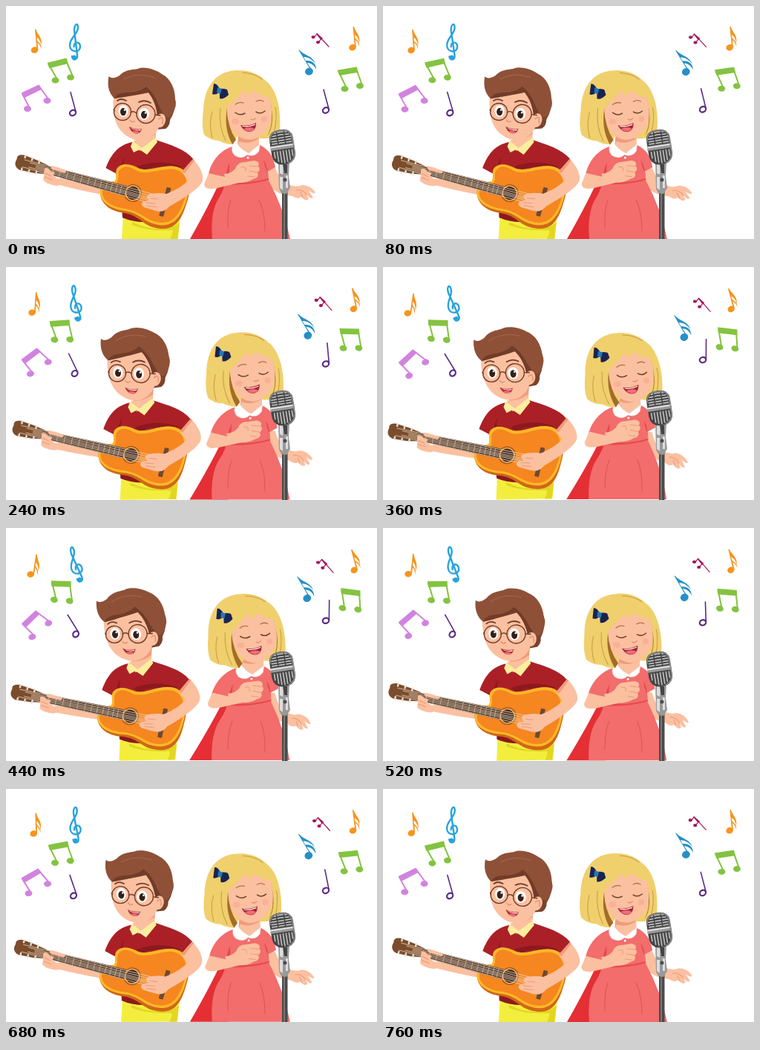
An HTML page that plays this animation: 500 by 315 pixels, repeating every 0.8 s.

```html
<!DOCTYPE html>
<html lang="en">
<head>
<meta charset="utf-8">
<title>Singing children</title>
<style>
html, body { margin: 0; width: 100%; height: 100%; overflow: hidden; background: #fff; }
svg { display: block; width: 100vw; height: 100vh; }
.line { fill: none; stroke-linecap: round; stroke-linejoin: round; }
.skin { fill: #fbc0a0; }
.shade { fill: #ef9c7a; }
.orange { fill: #f7941e; }
.blue { stroke: #27a3dd; fill: #27a3dd; }
.green { fill: #84c341; stroke: #84c341; }
.lilac { fill: #d183df; stroke: #d183df; }
.violet { stroke: #5b2c83; }
.plum { fill: #a5175f; stroke: #a5175f; }
</style>
</head>
<body>
<svg viewBox="0 0 500 315">
  <defs>
    <g id="flagged">
      <ellipse rx="4.800" ry="4.200" transform="rotate(-20)"/>
      <path d="M3 0L.500-28L2-28C4-20 11-17 9-6C8-13 5-16 3-17L3.500-13C5-10 10-9 9-1C8-7 5-9 4-10L4.800 0Z"/>
    </g>
    <g id="half" class="line" stroke-width="1.600">
      <path d="M-3-28L4-2"/>
      <ellipse rx="4.300" ry="3.600" stroke-width="2.200" transform="rotate(-35)"/>
    </g>
  </defs>

  <g id="n0" class="orange"><use href="#flagged" x="38.500" y="59.500"/></g>
  <g id="n1" class="blue">
    <path class="line" stroke-width="2.400" d="M89 68C89 74 97 74 96 66L92 33C92 25 97 21 97 29C97 38 86 43 86 53C86 63 100 64 100 55C100 47 91 48 91.500 55"/>
    <circle cx="92" cy="69.500" r="3" stroke="none"/>
  </g>
  <g id="n2" class="green" stroke-width="2">
    <path d="M57 77.500L81 71.500L82.500 77L59 83Z"/>
    <path class="line" d="M57.500 79L69 99M80.500 73L90 95"/>
    <ellipse cx="66.500" cy="100.500" rx="4" ry="3"/><ellipse cx="87" cy="96.500" rx="4" ry="3"/>
  </g>
  <g id="n3" class="lilac" stroke-width="2">
    <path d="M22 118L44 107.500L47 112L25 123Z"/>
    <path class="line" d="M22 119L32 138M45 109L58 127"/>
    <ellipse cx="29" cy="139" rx="4" ry="3"/><ellipse cx="55.500" cy="128" rx="4" ry="3"/>
  </g>
  <g id="n4" class="violet"><use href="#half" x="90" y="144.500"/></g>
  <g id="n5" class="plum" stroke-width="1.200">
    <path class="line" d="M415 43L419 37.500L435 55M421 49L425 44"/>
    <path d="M418.500 37.500L426 43.500L424.500 45Z"/>
    <ellipse cx="414" cy="42" rx="2" ry="1.500"/><ellipse cx="420.500" cy="49" rx="2" ry="1.500"/>
  </g>
  <g id="n6" fill="#278fc7">
    <ellipse cx="408.500" cy="88.500" rx="5.500" ry="5" transform="rotate(-25 408.500 88.500)"/>
    <path d="M411.500 88L394 59L396 60C402 67 413 67 417 78C411 70 405 69 401 69L404 74C411 73 418 77 418 86C415 79 410 77 406 77L413.500 88Z"/>
  </g>
  <g id="n7" class="orange"><use href="#flagged" x="467" y="56"/></g>
  <g id="n8" class="green" stroke-width="2">
    <path d="M448 87.500L472 83.500L473.500 89L450 93Z"/>
    <path class="line" d="M448.500 89L459 111M472 85L480 107"/>
    <ellipse cx="456.500" cy="112" rx="4" ry="3"/><ellipse cx="477" cy="108" rx="4" ry="3"/>
  </g>
  <g id="n9" class="violet"><use href="#half" x="431" y="141"/></g>

  <g id="boy">
    <path fill="#f3ee3d" d="M158 280L236 272L232 315H156Z"/>
    <path fill="#e3d622" d="M170 292Q188 301 207 301Q222 302 234 293L231 315H221Q226 306 224 303Q192 305 170 296Z"/>
    <path fill="#ab2027" d="M170 184C153 188 143 197 134.500 219L153 229L157 286Q174 292 193 292L238 224L252.500 207C241 193 222 188 202 181Z"/>
    <path fill="#8c191f" d="M157 277L189 288L192 292Q172 293 157 286ZM153 226Q155 211 160 204Q157 217 158 229ZM177 217Q208 206 236 217L234 222Q206 212 184 223Z"/>
    <path class="shade" d="M174 177L203 162L201 184L180 195Z"/>
    <path class="skin" d="M172 181Q188 183 202 173L199 187L180 196Z"/>
    <path fill="#fbee9d" d="M171 182L168 190L172 198L180 194L190 201L204 184L202 178L183 192Z"/>
  </g>

  <g id="boyHead">
    <path fill="#7a432c" d="M197 105L228 125Q229 142 221 154Q221 162 215 166L202 167Z"/>
    <path class="skin" d="M146 115C142 142 146 160 157 171C169 182 181 184 192 179Q204 173 207 161L205 112Z"/>
    <path fill="#8e5137" d="M138.500 95C143 99 148 97 153 94C163 84 173 87 180 84C191 82 203 87 210 92C222 98 228 112 228 126Q231 134 225 144Q222 152 217 151Q210 144 204 149C203 137 199 126 192 117C180 120 169 121 160 123L146 125C139 118 136 109 138.500 95Z"/>
    <path fill="#713c28" d="M146 125Q149 117 164 117Q180 117 189 109Q201 119 207 137L212 146Q207 145 204 149C203 137 199 126 192 117Q170 121 146 125Z"/>
    <path class="line" stroke="#a06346" stroke-width="1.300" d="M159 99Q178 89 200 97"/>
    <ellipse class="skin" cx="208" cy="155" rx="7" ry="9.500" transform="rotate(15 208 155)"/>
    <path class="line" stroke="#e38e69" stroke-width="1.300" d="M206 153Q213 147 211 159"/>
    <g fill="#fff"><ellipse cx="158" cy="142" rx="6.500" ry="8"/><ellipse cx="186" cy="146" rx="7" ry="8"/></g>
    <g fill="#352018"><ellipse cx="158" cy="143" rx="4" ry="5.200"/><ellipse cx="186" cy="147" rx="4" ry="5.200"/></g>
    <g fill="#fff"><circle cx="160" cy="140.500" r="1.300"/><circle cx="188" cy="144.500" r="1.300"/></g>
    <g class="line" stroke="#713b29">
      <path stroke-width="1.800" d="M150 128Q155 124 162 128M179 130Q187 126 195 131"/>
      <path stroke-width="1.400" d="M168 144Q172 141 176 145M201 147L208 148M146 142L145 140"/>
      <circle cx="157" cy="143" r="11.500" stroke-width="1.400"/><circle cx="188.500" cy="146" r="12.500" stroke-width="1.400"/>
    </g>
    <path class="line" stroke="#e58e6c" stroke-width="1.500" d="M167 154Q169 158 173 156"/>
    <path fill="#b32831" d="M166 163Q175 168 183 166C181 176 169 174 166 163Z"/>
    <path fill="#fff" d="M167.500 164.500Q175 168.500 182 167L181 168.500Q173 169 167.500 164.500Z"/>
    <path fill="#f16f72" d="M170 169Q176 168 180 171Q174 175 170 169Z"/>
  </g>

  <g id="guitar">
    <path class="skin" d="M63 234L75 233L134 247L130 255Q98 249 72 242Z"/>
    <path fill="#d16716" d="M150 219C157 211 169 214 178 219C193 226 212 212 232 218C253 225 250 249 242 271C234 296 222 306 198 299C184 295 178 283 160 280C136 277 126 264 127 250C128 240 136 238 147 237C151 230 146 226 150 219Z"/>
    <path fill="#fdb827" d="M150 219C157 211 169 214 178 219C193 226 212 212 232 218C249 224 249 242 244 260C235 293 219 301 198 294C186 291 178 279 160 277C135 273 126 262 127 250C128 240 136 238 147 237C151 230 146 226 150 219Z"/>
    <path fill="#f58620" d="M153 222C159 214 168 217 177 223C193 230 214 216 231 222C246 228 245 243 241 260C232 290 218 297 199 291C187 287 179 277 161 274C138 271 129 260 130 251C131 242 139 241 149 240C154 231 149 227 153 222Z"/>
    <g transform="translate(171 253) rotate(15.300)">
      <circle r="12" fill="#a65a20"/><circle r="10.500" fill="#f3b25b"/><circle r="9" fill="#452c22"/>
      <path fill="#7b4d2d" d="M-120-6L-136-9L-155-11Q-165-10-163-3Q-166 7-156 10L-136 9L-120 6Z"/>
      <path fill="#53392b" d="M-124-5.500L-10-7V7L-124 5.500Z"/>
      <path stroke="#bca188" stroke-width=".8" d="M-112-5V5M-102-5V5M-92-5V5M-82-5V5M-72-5V5M-62-5V5M-53-5V5M-45-5V5M-37-5V5M-30-6V6M-23-6V6M-17-6V6"/>
      <rect x="42" y="-20" width="6" height="40" rx="1" fill="#6c4a34"/>
      <path stroke="#eadbc3" stroke-width=".7" d="M-153-5L46-6M-145-3L46-3M-136-1L46 0M-136 1L46 2M-145 3L46 4M-153 5L46 7"/>
      <path class="line" stroke="#e1ddd4" stroke-width="2.400" d="M-153-11V-8M-143-10V-7M-133-9V-6M-153 7V10M-143 7V10M-133 6V9"/>
    </g>
    <path class="skin" d="M52 219Q57 218 60 223L66 225L64 229L71 235Q78 242 68 243Q54 241 50 235Q52 230 51 226Z"/>
    <path class="skin" d="M59 216Q64 215 82 223L79 226L62 221Z"/>
    <path class="line" stroke="#e69775" d="M53 226L61 230M52 231L62 235"/>
  </g>

  <g id="boyArm">
    <path class="skin" d="M237 224L252 207C261 216 267 228 265 236C262 246 240 260 220 271C214 279 207 278 202 277L186 272Q180 268 185 264L193 263Q186 257 194 254Q207 252 216 254C229 249 240 242 245 236Z"/>
    <path class="line" stroke="#e99a78" d="M189 266L201 267M190 270L203 272M195 260L205 261"/>
    <path class="shade" d="M237 224L252 207L254 209L241 226Z"/>
  </g>

  <g id="girlHand">
    <path class="skin" d="M350 219L363 219Q370 237 380 241Q391 246 399 242Q410 242 417 252Q416 255 408 250L414 259Q411 262 405 255L408 261Q404 265 398 258Q393 262 386 257Q365 255 354 243Z"/>
    <path class="line" stroke="#e89a79" d="M391 249Q399 247 405 255M397 252L400 259"/>
  </g>

  <g id="girl">
    <path fill="#e42f35" d="M294 224Q278 262 248 315H300L320 236Z"/>
    <path fill="#f26d6c" d="M305 190C289 195 277 209 273 227L295 234Q296 245 286 261Q275 279 278 315H383Q375 275 354 236L352 224L363 218C360 202 354 194 342 188Z"/>
    <path fill="#e6474d" d="M295 234Q298 220 301 212Q302 229 297 244ZM352 224Q348 216 347 208Q353 217 354 235ZM297 238Q328 241 354 233V235Q327 243 295 241Z"/>
    <path class="line" stroke="#de5357" d="M303 262Q298 275 299 300M341 262Q349 279 349 304"/>
    <path class="shade" d="M313 172H341V191L326 202L312 190Z"/>
    <path class="skin" d="M314 183Q327 188 341 179V191L326 199L312 189Z"/>
    <path fill="#fff" stroke="#e8dfe0" stroke-width=".6" d="M306 187Q302 195 308 202Q318 208 325 201Q335 205 341 196L342 187L327 199Q316 194 310 184Z"/>
    <circle cx="326" cy="205" r="1.500" fill="#fff"/>
  </g>
  <g id="girlArm">
    <path class="skin" d="M273 226L295 231L294 227Q303 227 309 220Q312 211 322 211L335 209Q343 211 340 216Q344 221 339 225Q342 232 333 234Q325 239 314 239L285 246Q268 250 267 241Z"/>
    <path class="line" stroke="#e99a78" d="M328 216L340 217M328 223L339 225M326 230L335 231M317 218Q324 216 323 223"/>
  </g>

  <g id="girlHead">
    <path fill="#f0cf6d" d="M312 87C284 87 267 108 266 141Q263 162 267 174Q276 182 287 182Q295 187 306 187L313 174L343 179Q363 181 369 166C371 143 366 113 350 101C340 91 326 86 312 87Z"/>
    <path fill="#a56b2b" d="M298 138Q298 163 310 181L305 187Q293 165 298 138ZM355 137Q362 157 352 176Q364 160 355 124Z"/>
    <path class="skin" d="M298 135L326 110L354 119C360 140 360 155 352 166C344 177 333 183 322 180C307 176 298 160 298 140Z"/>
    <path fill="#f0cf6d" d="M294 143C299 134 313 125 321 113Q323 119 328 122Q329 116 333 114Q344 121 357 125L347 101L313 90L292 107Z"/>
    <path class="line" stroke="#c99a45" d="M319 90Q335 91 345 99M278 143Q273 160 278 178M289 138Q286 162 296 182M363 137Q366 151 361 172"/>
    <g class="line" stroke="#704128" stroke-width="1.500">
      <path d="M309 144Q315 149 322 145M337 143Q343 147 349 142"/>
      <path stroke="#ad753e" stroke-width="1.300" d="M309 133Q314 129 320 131M337 129Q342 126 347 129"/>
    </g>
    <path class="line" stroke="#e48c72" stroke-width="1.400" d="M330 153Q333 155 336 152"/>
    <g fill="#f78d83" opacity=".3"><ellipse cx="309" cy="156" rx="5" ry="4"/><ellipse cx="348" cy="153" rx="4" ry="4"/></g>
    <path fill="#a72231" d="M316 161Q327 163 337 158C338 173 322 174 316 161Z"/>
    <path fill="#fff" d="M318 162Q328 163 336 159.500L335.500 161Q327 164.500 319 163Z"/>
    <path fill="#f56c77" d="M320 166Q329 162 335 166Q329 173 320 166Z"/>
    <path fill="#192451" d="M288 112Q284 104 280 105L278 119Q283 121 288 116L288 125Q293 127 300 120L298 113Q293 111 288 112Z"/>
    <path fill="#2577b8" d="M285 110L291 112L289 119L284 117Z"/>
  </g>

  <g id="mic">
    <path fill="#4b4b4b" d="M372 240H379.500V315H372Z"/>
    <path fill="#777" d="M374 246H376V315H374Z"/>
    <path fill="#999" d="M367 211L382 211L381 230L383 246L378 254L371 253L368 247Z"/>
    <path fill="#ddd" d="M369 214H374L373 228L369 226ZM369 231H373V249L369 246ZM377 229H380V246H377Z"/>
    <path fill="#444" d="M373 214H379V226H375Z"/>
    <circle cx="376" cy="235" r="2.500" fill="#4c4c4c"/>
    <g transform="translate(372.500 190) rotate(-9)">
      <path fill="#454545" d="M-16-10Q-16-23 0-23Q16-23 16-10V11Q15 22 5 24H-5Q-15 22-16 11Z"/>
      <path class="line" stroke="#c9c9c9" stroke-width="1.500" d="M-8-19Q0-21 8-19M-11-15.500Q0-17 11-15.500M-13-12H13M-13-8.500H13M-13-5H13"/>
      <path class="line" stroke="#bbb" stroke-width="1.700" d="M-12 6V14M-8 6V19M-4 6V21M0 6V22M4 6V21M8 6V19M12 6V14"/>
      <path stroke="#454545" stroke-width="1.500" d="M-5-22V-4M5-22V-4"/>
      <path fill="#9a9a9a" d="M-16.500-2.500H16.500V3.500H-16.500Z"/><path fill="#eee" d="M-16.500-1.500H16.500V0H-16.500Z"/>
      <path class="line" stroke="#8b8b8b" stroke-width="1.500" d="M-15-9Q-15-22 0-22Q15-22 15-9V10Q14 21 5 23"/>
    </g>
  </g>
</svg>
<script>
// id: dx, dy, turn in degrees, pivot x, pivot y, lean in degrees
const sway = {
  n0: [1, 4, 14, 39, 33], n1: [.5, 1, -18, 93, 48], n2: [2, -1, 16, 74, 86],
  n3: [1, 6, -18, 39, 123], n4: [.5, -.5, -17, 90, 132], n5: [6.5, 5, 2, 423, 46],
  n6: [-2.5, 6.5, 1, 405, 75], n7: [0, 1, -10, 468, 43], n8: [1, -1, 17, 464, 97],
  n9: [0, -16, 16, 431, 141],
  boy: [-4, -1, -1, 190, 290], boyHead: [-6, -2.5, -7, 182, 187],
  guitar: [-4, 1.5, -3.5, 171, 253], boyArm: [-4, -3, -1.5, 240, 235],
  girl: [0, -1, 0, 320, 300, -3], girlHead: [6.5, 2, -3, 318, 140],
  girlArm: [5, -3, 1, 310, 230], girlHand: [-2, 3, 9, 355, 230]
};
const step = 40, loop = 800, peak = 408;

function draw(now) {
  const time = Math.floor(now % loop / step) * step;
  const p = (1 + Math.cos(2 * Math.PI * (time - peak) / loop)) / 2;
  for (const [id, [dx, dy, turn, x, y, lean = 0]] of Object.entries(sway)) {
    document.getElementById(id).setAttribute('transform',
      `translate(${x + dx * p} ${y + dy * p}) rotate(${turn * p}) skewX(${lean * p}) translate(${-x} ${-y})`);
  }
  requestAnimationFrame(draw);
}
draw(0);
</script>
</body>
</html>
```
